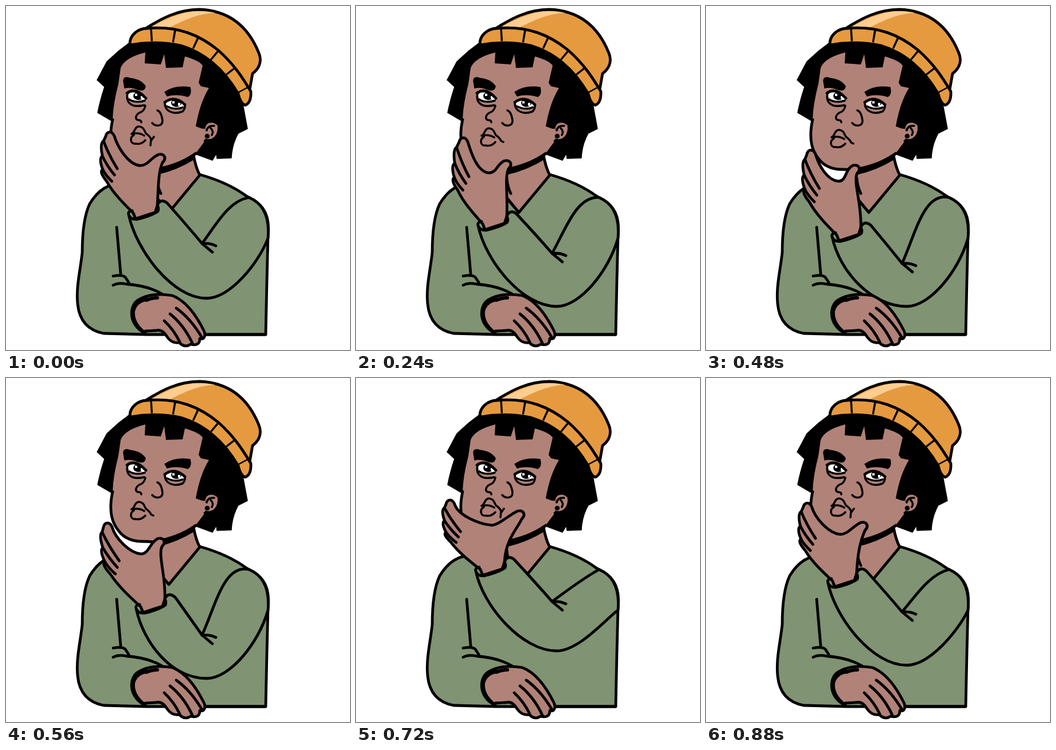
These frames come from a looping animation (600 by 600 pixels, 960 ms). An HTML page:

```html
<!DOCTYPE html>
<html lang="en">
<head>
<meta charset="utf-8">
<title>Thinking</title>
<style>
  html, body { margin: 0; width: 100%; height: 100%; overflow: hidden; background: #fff; }
  svg { display: block; width: 100%; height: 100%; }
  path { fill: none; stroke: #000; stroke-width: 4.8; stroke-linecap: round; stroke-linejoin: round; }
  .skin { fill: #b18278; }
  .green { fill: #809372; }
  .orange { fill: #e59a40; }
  .black { fill: #000; stroke-width: 1.5; }
  .white { fill: #fff; stroke: none; }
  .plain { stroke: none; }
  .thin { stroke-width: 3.5; }
  .ribs { stroke-width: 21; stroke-linecap: butt; stroke-dasharray: 3.5 36; }
</style>
</head>
<body>
<svg viewBox="0 0 600 600">
  <!-- torso -->
  <path class="green" d="M210 308C178 308 160 322 146 345C135 368 133 400 133 430C129 465 122 490 125 520C128 550 145 566 170 571L245 573H453L455 480L457 400C462 355 440 342 420 332C400 317 370 303 338 294L284 360L250 320Z"/>
  <path class="skin plain" d="M258 280L262 332L284 360L338 295L327 255Z"/>
  <path d="M327 260Q331 282 338 295L284 360L261 332M263 300Q264 315 270 327"/>
  <path d="M193 386L200 467M187 471Q203 468 208 473L214 482"/>

  <!-- head -->
  <path class="black" d="M218 62L197 78L176 97L159 129L172 141Q164 165 160 186L184 200L200 215L330 258L360 269L367 257L368 266L393 265Q394 242 405 222L421 214L411 160L340 70Z"/>
  <path id="face" class="skin plain"/>
  <path id="jaw"/>
  <path class="black" d="M255 286Q300 278 331 255L328 267Q300 285 262 294Z"/>
  <path class="skin" d="M345 216C345 200 360 197 371 207C374 227 361 239 345 233"/>
  <path class="skin plain" d="M337 214H347V233L337 240Z"/>
  <path class="thin" d="M350 217Q352 208 363 209M357 213Q363 219 359 225"/>
  <circle cx="351" cy="227" r="4.3"/>

  <!-- brows, eyes, nose, mouth -->
  <path class="black" d="M205 131Q205 122 216 126Q235 128 243 140Q242 149 231 146Q217 140 207 143ZM277 150Q295 138 321 142Q324 154 317 158Q297 152 281 157Z"/>
  <path class="white" d="M212 153Q226 144 243 162Q240 169 226 167Q214 164 212 153ZM278 167Q294 157 311 173Q304 181 289 179Q280 176 278 167Z"/>
  <ellipse cx="231" cy="157" rx="9" ry="7"/>
  <ellipse cx="297" cy="169" rx="9" ry="7"/>
  <path class="white" d="M225 153h4v4h-4zM235 157h4v5h-4zM290 166h4v4h-4zM300 169h4v5h-4z"/>
  <path d="M211 152Q226 141 244 161M277 168Q294 155 312 172"/>
  <path class="thin" d="M212 153C209 165 215 179 241 173M215 163Q226 170 242 165M277 168C276 184 292 190 308 184Q313 179 312 172M281 175Q295 182 308 177"/>
  <path class="thin" d="M243 174Q241 184 233 186C226 190 224 198 231 199Q236 199 236 203M264 182C270 184 272 192 273 200C273 210 261 211 255 204"/>
  <path id="mouth" class="thin"/>

  <!-- hat -->
  <path class="orange" d="M241 41C270 22 300 6 337 6C395 8 425 42 441 82C448 99 439 111 430 118L425 146L320 75Z"/>
  <path class="plain" fill="#ffcd90" style="fill:#ffcd90" d="M250 39C279 22 309 9 336 9Q354 9 365 12C332 13 305 28 284 38Z"/>
  <path class="orange" d="M216 68C215 51 230 39 246 39C300 34 338 51 370 77C398 102 412 124 427 149Q428 169 417 173Q409 170 405 153C378 107 345 81 305 69Q262 60 216 68Z"/>
  <path class="ribs" d="M252 51C310 47 372 70 413 148"/>

  <!-- raised hand and its sleeve -->
  <path id="hand" class="skin"/>
  <path id="fingers"/>
  <path id="sleeve" class="green"/>
  <path id="crease"/>

  <!-- resting hand -->
  <path d="M187 487Q196 482 210 485Q248 488 272 502"/>
  <path class="skin" d="M243 571C215 558 213 525 230 513C250 501 273 502 290 505C311 513 330 536 345 566C350 576 344 583 338 580Q338 594 322 590Q312 597 302 587Q289 589 281 577Q273 563 262 566L243 567"/>
  <path d="M297 527Q322 545 341 577M286 537Q310 556 325 588M276 549Q293 565 303 586M347 573H453"/>
  <path style="stroke-width:6" d="M245 512Q226 515 222 532Q220 551 238 567M245 513Q254 509 264 509"/>
</svg>
<script>
const STEP = 80, STEPS = 12;

// The hand is led by three points; everything else follows from them.
const rest = { tip: [181, 223], thumb: [270, 265], wrist: [222, 361] };
const keys = [
  { at: 0, ...rest },
  { at: 3, tip: [187, 233], thumb: [263, 276], wrist: [221, 380] },
  { at: 5, tip: [189, 253], thumb: [252, 282], wrist: [221, 400] },
  { at: 7, tip: [177, 256], thumb: [269, 286], wrist: [235, 399] },
  { at: 9, tip: [164, 216], thumb: [286, 238], wrist: [217, 334] },
  { at: STEPS, ...rest }
];

const clamp = (v, lo, hi) => Math.min(hi, Math.max(lo, v));
const mix = (a, b, t) => a.map((v, i) => v + (b[i] - v) * t);
const add = ([x, y], dx, dy) => [x + dx, y + dy];
const off = (p, dx = 0, dy = 0) => add(p, dx, dy).join(' ') + ' ';
const draw = (id, d) => document.getElementById(id).setAttribute('d', d);

function poseAt(step) {
  const i = keys.findIndex(k => k.at > step), a = keys[i - 1], b = keys[i];
  const t = (step - a.at) / (b.at - a.at), ease = t * t * (3 - 2 * t);
  const [tip, thumb, wrist] = ['tip', 'thumb', 'wrist'].map(k => mix(a[k], b[k], ease));
  const crook = tip.map((v, k) => v + .473 * (thumb[k] - v) + .257 * (wrist[k] - v));
  return { tip, thumb, wrist, crook, heel: add(wrist, 42, -13) };
}

// The hand pushes the chin until it drops clear of it.
function drawHead({ crook: [, y] }) {
  const chin = y < 297 ? Math.max(280, y + 3) : 285;
  const jaw = `M186 198C180 225 182 249 196 266C206 280 222 ${chin} 236 ${chin}Q248 ${chin} 256 286Q300 279 330 258`;
  draw('jaw', jaw);
  draw('face', jaw + 'L345 238V215L331 210Q338 169 354 143L340 140L336 134L343 104Q337 95 312 88L308 107L279 108L276 84L270 102L242 100L243 81Q207 90 200 108L196 136Q187 170 186 198Z');

  const drop = clamp((y - 278) / 4, 0, 6), m = v => v + drop;
  const pout = drop < 3 ? `L252 ${m(243)}M253 ${m(235)}l5-7` : `L257 ${m(234)}`;
  draw('mouth', `M219 ${m(223)}C225 ${m(221)} 224 ${m(210)} 232 ${m(210)}C241 ${m(211)} 241 ${m(218)} 244 ${m(222)}Q251 ${m(227)} 253 ${m(232)}` + pout +
    `M219 ${m(223)}Q232 ${m(220)} 241 ${m(226)}M223 ${m(225)}C215 ${m(230)} 217 ${m(241)} 226 ${m(240)}Q236 ${m(242)} 243 ${m(234)}`);
}

function drawHand({ tip, thumb, wrist, crook, heel }) {
  const side = (t, dx) => off(mix(tip, wrist, t), dx);
  const gaps = [.45, .28, .09];
  const spread = t => -9 - 65 * t + 37 * t * t;
  draw('hand', 'M' + off(tip, -7, 4) +
    'C' + off(tip, -5, -5) + off(tip, 4, -6) + off(tip, 8, 4) +
    'C' + off(tip, 14, 24) + off(crook, -20, -2) + off(crook) +
    'C' + off(crook, 14) + off(thumb, -18) + off(thumb, -4, -6) +
    'C' + off(thumb, 6, -8) + off(thumb, 11) + off(thumb, 3, 8) +
    'C' + off(thumb, -4, 24) + off(heel, 2, -40) + off(heel) +
    'L' + off(heel, -4, 12) + 'L' + off(wrist, 4, 10) + 'L' + off(wrist) +
    'C' + side(.9, -10) + side(.75, -25) + side(.6, -30) +
    gaps.map(t => 'Q' + side(t + .03, spread(t) - 8) + side(t, spread(t))).join('') + 'Z');
  draw('fingers', gaps.map((t, i) => {
    const end = .6 - i * .08, inner = i * 8 - 21;
    return 'M' + side(t, spread(t)) + 'Q' + side((t + end) / 2, (spread(t) + inner) / 2 - 3) + side(end, inner);
  }).join(''));
}

function drawArm({ wrist, heel }) {
  const lift = wrist[1] - 334;
  const fold = [342, 390 + lift * .9], elbow = [350, Math.min(524, 476 + lift * 1.25)];
  const shoulder = [424, 334], bend = Math.max(0, fold[1] - 386) * .8;
  draw('sleeve', 'M' + off(wrist, -8, 3) +
    'Q' + off(wrist, -5, 12) + off(wrist, 7, 11) +
    'Q' + off(heel, -10, 18) + off(heel, 1, 10) +
    'Q' + off(heel, 3, 4) + off(heel) +
    'C' + off(heel, 4, -12) + off(heel, 14, -9) + off(heel, 20, -1) +
    'Q' + off(mix(heel, fold, .6), 4, -6) + off(fold) +
    'C' + off(mix(fold, shoulder, .3), 0, -bend * .4) + off(mix(fold, shoulder, .65), -bend * .3, -bend) + off(shoulder) +
    'C450 345 460 370 457 405' +
    `C440 ${elbow[1] - 60} ` + off(elbow, 40) + off(elbow) +
    'C' + off(elbow, -60) + off(wrist, 5, 65) + off(wrist, -8, 3) +
    'Q' + off(wrist, -10, -3) + off(wrist, -2, -4));
  draw('crease', 'M' + off(fold) + 'L' + off(fold, 18, 15) +
    'M' + off(fold, 3) + 'Q' + off(fold, 14, -1) + off(fold, 24, 4));
}

let shown = -1;
function frame(now) {
  const step = Math.floor(now / STEP) % STEPS;
  if (step !== shown) {
    shown = step;
    const pose = poseAt(step);
    for (const part of [drawHead, drawHand, drawArm]) part(pose);
  }
  requestAnimationFrame(frame);
}
frame(performance.now());
</script>
</body>
</html>
```
